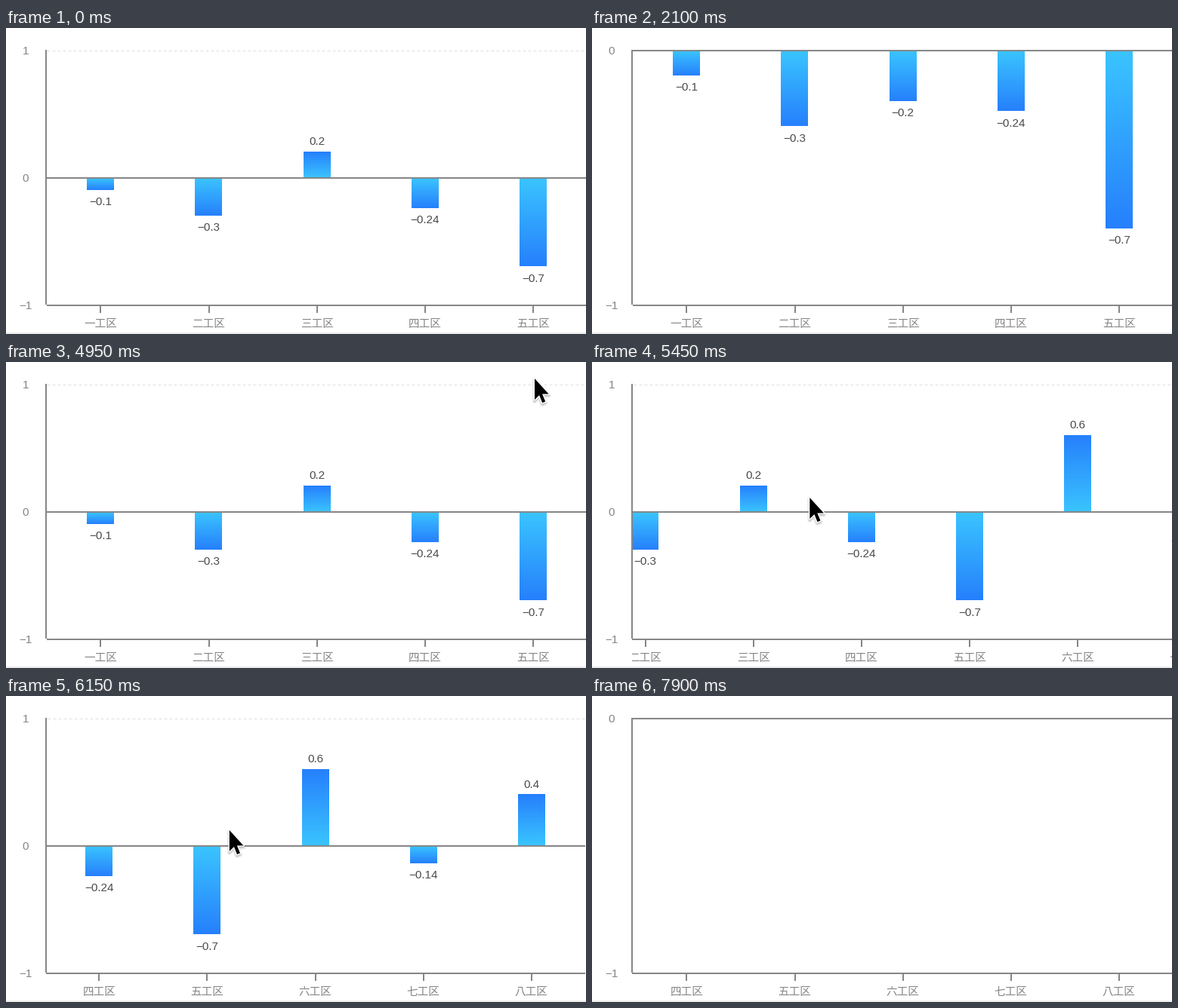
Recreate the animation shown at these times as a matplotlib script. Size 768 by 406 pixels, loop 8 s.

```python
import math

import numpy as np
import matplotlib.pyplot as plt
from matplotlib.animation import FuncAnimation
from matplotlib.patches import Polygon
from matplotlib.transforms import Bbox, TransformedBbox

W, H, DPI = 768, 406, 128
STEP, LOOP = 50, 8000

LEFT, TOP, BOTTOM = 53, 29, 367
PITCH, FIRST, BAR = 143.1, 125.4, 36
NAMES = [c + "工区" for c in "一二三四五六七八"]
MIXED = [-0.1, -0.3, 0.2, -0.24, -0.7, 0.6, -0.14, 0.4]
NEGATIVE = [-abs(v) for v in MIXED]
END_SHIFT, MAX_SHIFT = 3 * PITCH, 482

AXIS, MUTED, INK = "#868688", "#858585", "#4a4a4a"
DEEP, LIGHT = np.array([38, 128, 252]) / 255, np.array([58, 196, 255]) / 255


def pt(px):
    return px * 72 / DPI


fig = plt.figure(figsize=(W / DPI, H / DPI), dpi=DPI, facecolor="white")
ax = fig.add_axes([0, 0, 1, 1])
ax.axis("off")

plot_box = Bbox([[LEFT, 0], [W, H]])
reveal_box = Bbox([[LEFT, 0], [W, H]])
plot_clip = TransformedBbox(plot_box, ax.transData)
reveal_clip = TransformedBbox(reveal_box, ax.transData)


def clipped(artist, box):
    artist.set_clip_box(box)
    artist.set_clip_on(True)
    return artist


def line(xs, ys, color=AXIS, width=2, z=3, **kw):
    return ax.plot(xs, ys, color=color, lw=pt(width), zorder=z,
                   solid_capstyle="butt", **kw)[0]


def label(text, x, y, color, size=15.2, font="Liberation Sans"):
    return ax.text(x, y, text, fontsize=pt(size), color=color, family=font,
                   ha="center", va="baseline", zorder=4)


def number(v):
    return f"{v:g}".replace("-", "\u2212")


ramp = np.linspace(0, 1, 64)[:, None, None]
gradient = np.repeat(DEEP + (LIGHT - DEEP) * ramp, 2, axis=1)
bars = [clipped(ax.imshow(gradient, extent=(0, 1, 1, 0), aspect="auto",
                          interpolation="bilinear", zorder=2), reveal_clip)
        for _ in NAMES]
values = [clipped(label("", 0, 0, INK), reveal_clip) for _ in NAMES]
names = [clipped(label(n, 0, 396.5, MUTED, 14.6, "Noto Sans CJK JP"), plot_clip)
         for n in NAMES]
ticks = [clipped(line([0, 0], [369, 378]), plot_clip) for _ in NAMES]

dashes = clipped(line([0, 1], [29.5, 29.5], "#e0e0e0", 1, 1,
                      linestyle=(0, (4, 3)), dash_capstyle="butt"), plot_clip)
zero_line = clipped(line([0, 1], [199, 199]), plot_clip)
base_line = clipped(line([0, 1], [368, 368]), plot_clip)
line([LEFT, LEFT], [TOP, BOTTOM], z=5)
line([0, W], [405, 405], "#ebebeb", 2)

top_mark = label("1", 26, TOP + 5.6, MUTED)
mid_mark = label("0", 26, 198 + 5.6, MUTED)
label(number(-1), 26, BOTTOM + 5.9, MUTED)

ARROW = np.array([(0, 0), (0, 16.3), (3.7, 12.8), (6.2, 18.7),
                  (8.6, 17.7), (6.1, 11.9), (11.3, 11.9)]) * [1.65, 1.72]
shadows = [Polygon(ARROW, fc="black", ec="black", lw=pt(w), alpha=0.07,
                   joinstyle="round", zorder=8) for w in (2, 4, 6)]
arrow = Polygon(ARROW, fc="black", ec="white", lw=pt(3), zorder=9,
                joinstyle="round")
arrow_fill = Polygon(ARROW, fc="black", ec="none", zorder=10)
pointer_parts = shadows + [arrow, arrow_fill]
for p in pointer_parts:
    ax.add_patch(p)

ax.set_xlim(0, W)
ax.set_ylim(H, 0)
ax.autoscale(False)


def phase(t, start, end):
    return min(max((t - start) / (end - start), 0), 1)


def scene(t):
    """Whether the axis runs from 1 to -1, and how far down bars are shown."""
    if t < 900:
        return True, H
    if t < 3300:
        mixed, age, length = False, t - 1050, 500
    elif t < 7900:
        mixed, age, length = True, t - 3300, 800
    else:
        return False, TOP
    if age >= length:
        return mixed, H
    return mixed, TOP + 338 * (1 - math.exp(-2.82 * max(age, 0) / 1000))


def scroll(t):
    """Drag, then a flick past the end, then a spring back."""
    if t < 5450:
        return 198 * phase(t, 5150, 5450) ** 1.5
    if t < 5750:
        u = phase(t, 5450, 5750)
        return 198 + (MAX_SHIFT - 198) * (1 - (1 - u) ** 1.7)
    if t < 6400:
        return END_SHIFT + (MAX_SHIFT - END_SHIFT) * math.exp((5750 - t) / 123)
    return END_SHIFT


def pointer(t):
    if not 4950 <= t < 6500:
        return None
    if t < 5150:
        u = 1 - (1 - phase(t, 4950, 5200)) ** 2
        return 700 - 215 * u, 22 + 160 * u
    if t < 5450:
        return 486 - scroll(t), 182 - 2 * phase(t, 5150, 5450)
    if t < 6200:
        u = phase(t, 5450, 5750)
        return 288.3 + 7.5 * u, 180 - 2 * u
    u = phase(t, 6200, 6500) ** 1.5
    return 295.8 + 70 * u, 178 - 200 * u


def place_bar(bar, x, zero, end):
    """Fit a bar to whole pixels; the tiny inset keeps its size from rounding up."""
    left, base, end = round(x - BAR / 2), zero + 1, round(end)
    inset = math.copysign(0.01, end - base)
    bar.set_extent((left + 0.01, left + BAR - 0.01, base + inset, end - inset))


def update(i):
    t = i * STEP
    mixed, shown = scene(t)
    shift = scroll(t)
    zero, unit = (198, 169) if mixed else (TOP, 338)
    reveal_box.set_points(np.array([[LEFT, 0], [W, shown]]))

    data = MIXED if mixed else NEGATIVE
    for k, v in enumerate(data):
        x = FIRST + PITCH * k - shift
        end = zero - v * unit
        place_bar(bars[k], x, zero, end)
        bars[k].set_visible(shown > TOP + 1)
        values[k].set_text(number(v))
        values[k].set_position((x, end + (-14.2 if v > 0 else 15) + 5.4))
        values[k].set_visible(shown > TOP + 1)
        names[k].set_x(x)
        ticks[k].set_xdata([x, x])

    ends = [54 - shift, 54 + PITCH * len(data) - shift]
    for item in (dashes, zero_line, base_line):
        item.set_xdata(ends)
    zero_line.set_ydata([zero + 1, zero + 1])
    dashes.set_visible(mixed)
    mid_mark.set_visible(mixed)
    top_mark.set_text("1" if mixed else "0")

    tip = pointer(t)
    for p in pointer_parts:
        p.set_visible(tip is not None)
        if tip:
            p.set_xy(ARROW + tip + ([0, 2] if p in shadows else [0, 0]))
    return []


anim = FuncAnimation(fig, update, frames=LOOP // STEP, interval=STEP,
                     init_func=lambda: update(0), repeat=True,
                     repeat_delay=0, blit=False)
plt.show()
```
